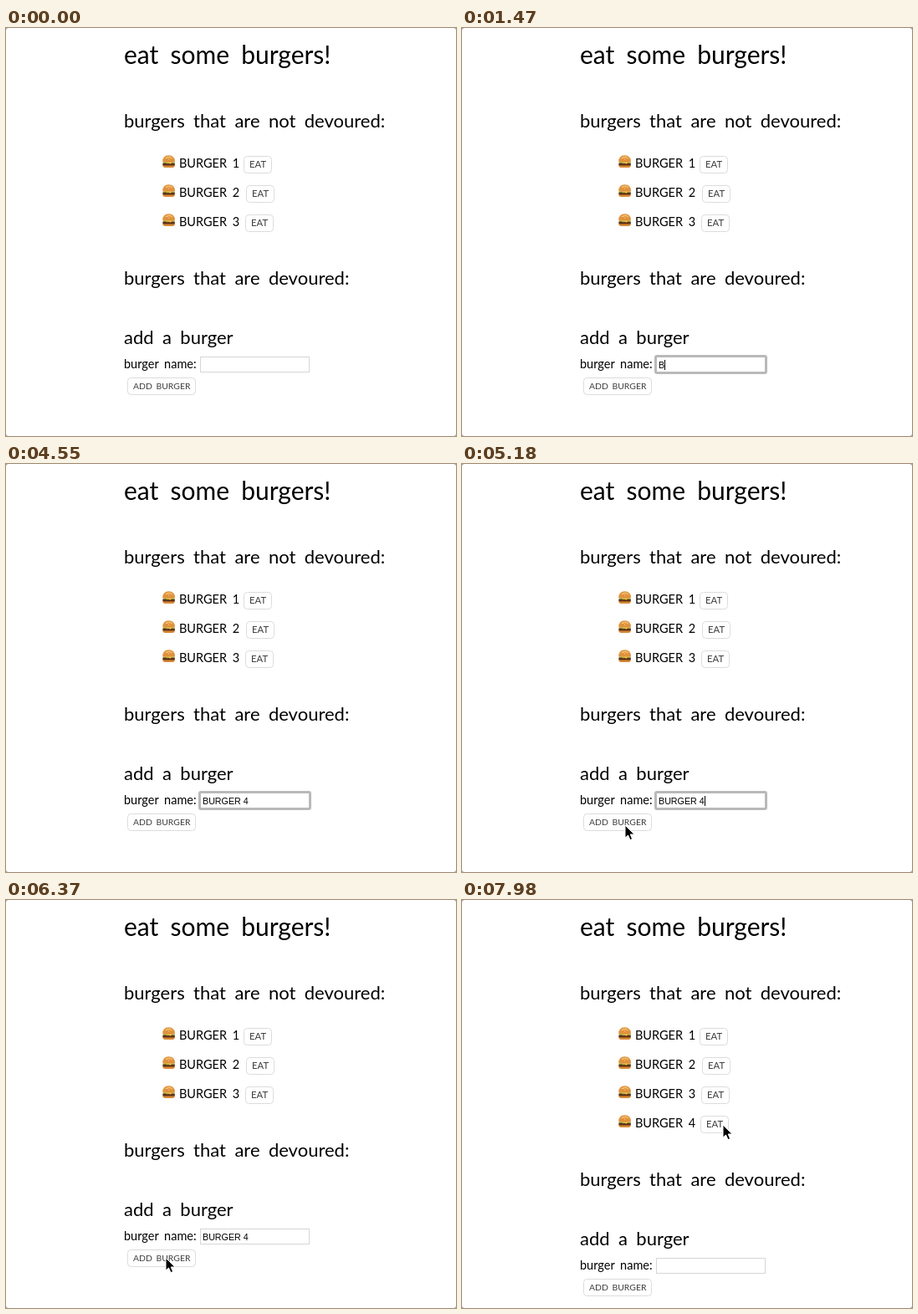
These frames come from a looping animation (538 px wide and 488 px high, 8000 ms). An HTML page:

```html
<!DOCTYPE html>
<html lang="en">
<head>
<meta charset="utf-8">
<title>eat some burgers!</title>
<style>
  html, body { margin: 0; width: 100%; height: 100%; overflow: hidden; background: #aaa; }
  svg { display: block; width: 538px; height: 488px; }
  text { font-family: Lato, "Open Sans", sans-serif; white-space: pre; }
  .h1 { font-size: 30px; word-spacing: 6.5px; }
  .h2 { font-size: 22px; word-spacing: 4.8px; }
  .label { font-size: 14.5px; word-spacing: 3px; }
  .button rect { fill: #fff; stroke: #dcdcdc; }
  .button text { fill: #3c3c3c; word-spacing: 2px; }
  .typed { font: 10.7px "Liberation Sans", Arial, sans-serif; }
</style>
</head>
<body>
<svg viewBox="0 0 538 488">
  <defs>
    <g id="burger">
      <path d="M.3 12q0 3 3 3h8.600q3 0 3-3z" fill="#d98a35"/>
      <rect x=".2" y="9" width="14.800" height="3.600" rx="1.700" fill="#5e3019"/>
      <path d="M.2 8.500h14.800l-1.500 1.800-2-.8-2 1-2-1-2 1-2-1-2 .6z" fill="#7fa63c"/>
      <path d="M2 8.200h11l-3.500 2.200z" fill="#f2bd3d"/>
      <path d="M.3 7.800q0-7.600 7.300-7.600t7.300 7.600q0 .7-.8.700h-13q-.8 0-.8-.7z" fill="#df923c"/>
      <path d="M2.500 4.500q2-3 5.500-3t5 2.500q-5-1.500-10.500.5z" fill="#f0b765"/>
      <path d="M5 3.500h.8M8 2.500h.8M10.500 4h.8M7 5h.8" stroke="#fbe3b4"/>
    </g>
  </defs>
  <rect width="538" height="488" rx="3.500" fill="#fff"/>
  <text class="h1" x="141" y="43">eat some burgers!</text>
  <text class="h2" x="141" y="119">burgers that are not devoured:</text>
  <g id="list"></g>
  <g id="form">
    <text class="h2" x="141" y="307">burgers that are devoured:</text>
    <text class="h2" x="141" y="378">add a burger</text>
    <text class="label" x="141" y="407">burger name:</text>
    <rect x="232.500" y="393.500" width="130" height="18" fill="#fff" stroke="#d6d6d6"/>
    <rect id="ring" x="231.500" y="392.500" width="132" height="20" rx="1.500"
          fill="none" stroke="#b9b9b9" stroke-width="3"/>
    <text id="typed" class="typed" x="235" y="407"></text>
    <rect id="caret" y="397" width="1" height="12"/>
  </g>
  <g id="pointer">
    <path id="arrow" d="M0 0V15.200L3.500 12 6 17.600 8.600 16.500 6.200 11H11Z" stroke="#fff"/>
    <path id="beam" d="M-3-7.500Q0-7.500 0-5V5Q0 7.500-3 7.500M3-7.500Q0-7.500 0-5M0 5Q0 7.500 3 7.500" fill="none" stroke="#333"/>
  </g>
</svg>
<script>
const $ = id => document.getElementById(id);
const LOOP = 8000, STEP = 70, ROW = 35;
const FOCUS = 840, BLUR = 5950, ADDED = 6440;

// Each key press: [time, character]
const keys = [[1400, 'B'], [1610, 'U'], [1750, 'R'], [2240, 'G'],
              [2590, 'E'], [2800, 'R'], [3290, ' '], [3920, '4']];

// Pointer stops: [time, x, y]
const stops = [[140, 430, 23], [770, 262, 403], [4760, 262, 403], [4900, 240, 419],
               [5180, 195, 432], [5530, 194, 436], [6090, 191, 428],
               [7420, 191, 428], [7980, 312, 269]];

const button = (x, y, width, size, label) => `
  <g class="button">
    <rect x="${x + .5}" y="${y + .5}" width="${width}" height="20" rx="4"/>
    <text x="${x + 7}" y="${y + 13.5}" font-size="${size}">${label}</text>
  </g>`;

$('list').innerHTML = [284, 287, 286, 285].map((x, i) => `
  <g id="row${i}" transform="translate(0 ${i * ROW})">
    <use href="#burger" x="187" y="152"/>
    <text class="label" x="207" y="166.500">BURGER ${i + 1}</text>
    ${button(x, 153, 33, 11.3, 'EAT')}
  </g>`).join('');
$('form').insertAdjacentHTML('beforeend', button(145, 418, 81, 10.4, 'ADD BURGER'));

const show = (id, on) => $(id).setAttribute('visibility', on ? 'visible' : 'hidden');
const move = (id, x, y) => $(id).setAttribute('transform', `translate(${x} ${y})`);
const ease = p => p * p * (3 - 2 * p);

function pointerAt(t) {
  const next = stops.findIndex(s => s[0] > t);
  if (next < 0) return stops.at(-1).slice(1);
  const [t0, x0, y0] = stops[Math.max(0, next - 1)], [t1, x1, y1] = stops[next];
  const p = ease(Math.max(0, (t - t0) / (t1 - t0)));
  return [x0 + (x1 - x0) * p, y0 + (y1 - y0) * p];
}

function draw(t) {
  const added = t >= ADDED, focused = t >= FOCUS && t < BLUR;
  const pressed = keys.filter(k => k[0] <= t);
  const lastKey = pressed.length ? pressed.at(-1)[0] : FOCUS;

  show('row3', added);
  move('form', 0, added ? ROW : 0);
  show('ring', focused);

  const typed = $('typed');
  typed.textContent = added ? '' : pressed.map(k => k[1]).join('');
  $('caret').setAttribute('x', Math.round(235 + typed.getComputedTextLength()));
  show('caret', focused && (t - lastKey) % 980 < 420);

  const [x, y] = pointerAt(t);
  const visible = t >= 140 && (t < 1330 || t >= 4760);
  const overInput = !added && x > 232 && x < 363 && y > 393 && y < 412;
  move('pointer', x, y);
  show('arrow', visible && !overInput);
  show('beam', visible && overInput);
}

function tick() {
  const t = performance.now() % LOOP;
  draw(Math.floor(t / STEP) * STEP);
  requestAnimationFrame(tick);
}
tick();
</script>
</body>
</html>
```
